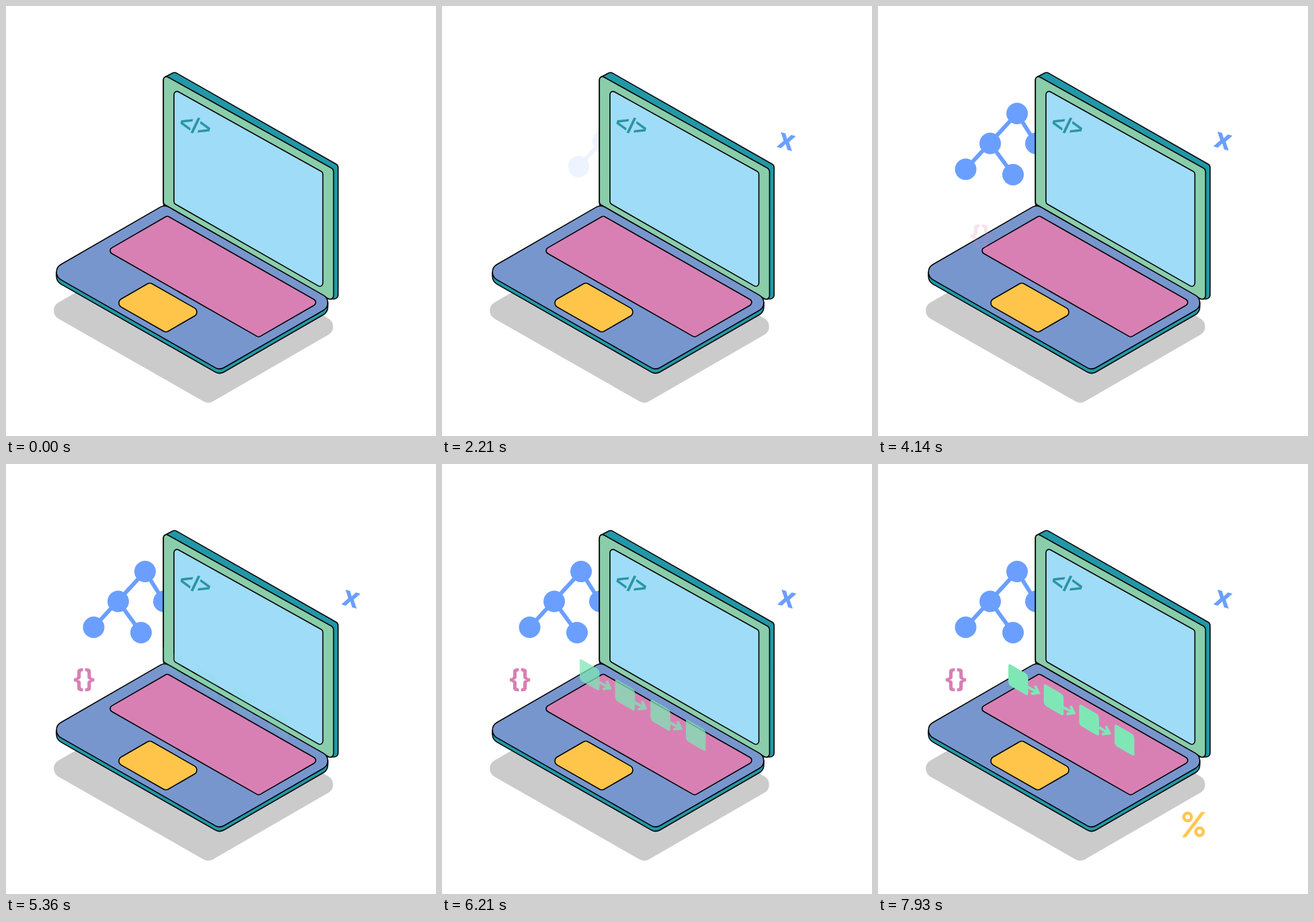
An HTML page for the animation above (8000 ms loop, 640x640 px).

```html
<!DOCTYPE html>
<html lang="en">
<head>
<meta charset="utf-8">
<title>Laptop with code symbols</title>
<style>
html, body { margin: 0; width: 100%; height: 100%; overflow: hidden; background: #fff; }
svg { display: block; width: 100%; height: 100%; }
text { font-family: "Open Sans", "Noto Sans", sans-serif; font-weight: 700; text-anchor: middle; }
.tag { font-family: "Liberation Sans", Arial, sans-serif; }
.ink { stroke: #000; stroke-width: 1.6; }
</style>
</head>
<body>
<svg viewBox="0 0 640 640">
  <g id="tree" fill="#6b9fff" stroke="#6b9fff"></g>
  <g id="laptop"></g>
  <text class="tag" transform="translate(282 177.5) rotate(15)" y="11.8" font-size="33" fill="#2a95a5">&lt;/&gt;</text>
  <g id="letter"><text transform="translate(513.5 201) rotate(15)" y="11.5" font-size="42" fill="#6b9fff">x</text></g>
  <g id="braces"><text x="116" y="331.5" font-size="40" fill="#d880b4">{}</text></g>
  <g id="chain" fill="#7fe7b6"></g>
  <g id="percent" fill="none" stroke="#ffc54a" stroke-width="4.8">
    <circle cx="461.6" cy="527.6" r="5.7"/>
    <circle cx="479.4" cy="549.6" r="5.7"/>
    <path d="M453.1 557.8L481.6 520.3H487.8L459.3 557.8Z" fill="#ffc54a" stroke="none"/>
  </g>
</svg>
<script>
const LOOP = 8000, DRIFT = 1900;
const TEAL = "#2297a8";
const byId = id => document.getElementById(id);

// Closed path through the points, each corner rounded with its radius.
function roundedPath(points, radii) {
  const n = points.length;
  return points.map(([x, y], i) => {
    const r = Array.isArray(radii) ? radii[i] : radii;
    const unit = ([px, py]) => {
      const d = Math.hypot(px - x, py - y);
      return [(px - x) / d, (py - y) / d];
    };
    const a = unit(points[(i + n - 1) % n]), b = unit(points[(i + 1) % n]);
    const half = Math.acos(a[0] * b[0] + a[1] * b[1]) / 2;
    const cut = r / Math.tan(half);
    const at = u => `${(x + u[0] * cut).toFixed(2)} ${(y + u[1] * cut).toFixed(2)}`;
    return `${i ? "L" : "M"}${at(a)}A${r} ${r} 0 0 1 ${at(b)}`;
  }).join("") + "Z";
}

const plate = (points, radii, fill, attrs = 'class="ink"') =>
  `<path d="${roundedPath(points, radii)}" fill="${fill}" ${attrs}/>`;

// Isometric rectangle lying flat: back corner, run to the right, run to the left.
function flat(x, y, right, left) {
  const corner = (r, l) => [x + r - l, y + 0.57 * r + 0.577 * l];
  return [corner(0, left), corner(0, 0), corner(right, 0), corner(right, left)];
}

// Upright panel facing left: left edge from top to bottom, then the right edge.
const upright = (x1, top1, bottom1, x2, top2, bottom2) =>
  [[x1, top1], [x2, top2], [x2, bottom2], [x1, bottom1]];

const base = y => flat(236, 295.7 + y, 256, 174);
const thickness = 6.5;

byId("laptop").innerHTML =
  plate(flat(257, 338, 244, 200), 14, "#cbcbcb", "") +
  plate([[234.3, 107], [251, 98.2], [494.3, 237], [494.3, 436], [480, 436], [234.3, 297]], 6, TEAL) +
  plate(upright(234.3, 102, 294.5, 487.5, 243, 440), [4.5, 7, 5, 5], "#8acdab") +
  plate(upright(250, 124, 293.7, 471.6, 247.5, 420.5), 4.5, "#9fdcf8") +
  plate(base(thickness), 13, TEAL) +
  `<path d="M75 396v${thickness}L318 540L479 ${441 + thickness}V441Z" fill="${TEAL}"/>` +
  `<path d="M75 396v${thickness}M479 441v${thickness}" class="ink"/>` +
  plate(base(0), 13, "#7896ce") +
  plate(flat(240, 312.3, 226, 90), 5, "#d880b4") +
  plate(flat(214, 411.5, 77, 53), 7, "#ffc54a");

const nodes = [[207, 160], [167, 204.5], [130.5, 243], [201, 251], [235, 204.5]];
const [root, left, leaf1, leaf2, right] = nodes;
byId("tree").innerHTML =
  `<path d="M${leaf1}L${root}L${right}M${left}L${leaf2}" fill="none" stroke-width="6"/>` +
  nodes.map(([x, y]) => `<circle cx="${x}" cy="${y}" r="16" stroke="none"/>`).join("");

const block = plate(upright(194, 296.5, 328.5, 223.5, 313.5, 345.5), [2, 9, 2, 9], "#7fe7b6", "");
const arrow = '<path d="M222 331.5L239 340.5M234 330L239 340.7L228 342" fill="none" stroke="#7fe7b6" stroke-width="4"/>';
for (let i = 0; i < 4; i++) {
  byId("chain").innerHTML +=
    `<g transform="translate(${52.7 * i} ${30 * i})">${block}${i < 3 ? arrow : ""}</g>`;
}

// Each part fades in while it drifts home from an offset.
const parts = [
  { id: "letter", start: 480, dx: -55, dy: 46 },
  { id: "tree", start: 1800, dx: 82, dy: -4.5 },
  { id: "braces", start: 3560, dx: 47, dy: 27 },
  { id: "chain", start: 4950, dx: 43, dy: -28 },
  { id: "percent", start: 6300, dx: -16, dy: -46 },
];

const easeInOut = t => (1 - Math.cos(Math.PI * Math.min(1, Math.max(0, t)))) / 2;

function draw(time) {
  for (const { id, start, dx, dy } of parts) {
    const p = easeInOut((time - start) / DRIFT);
    const group = byId(id);
    group.setAttribute("transform", `translate(${dx * (1 - p)} ${dy * (1 - p)})`);
    group.setAttribute("opacity", p);
  }
}

const begin = performance.now();
function tick() {
  draw((performance.now() - begin) % LOOP);
  requestAnimationFrame(tick);
}
tick();
</script>
</body>
</html>
```
